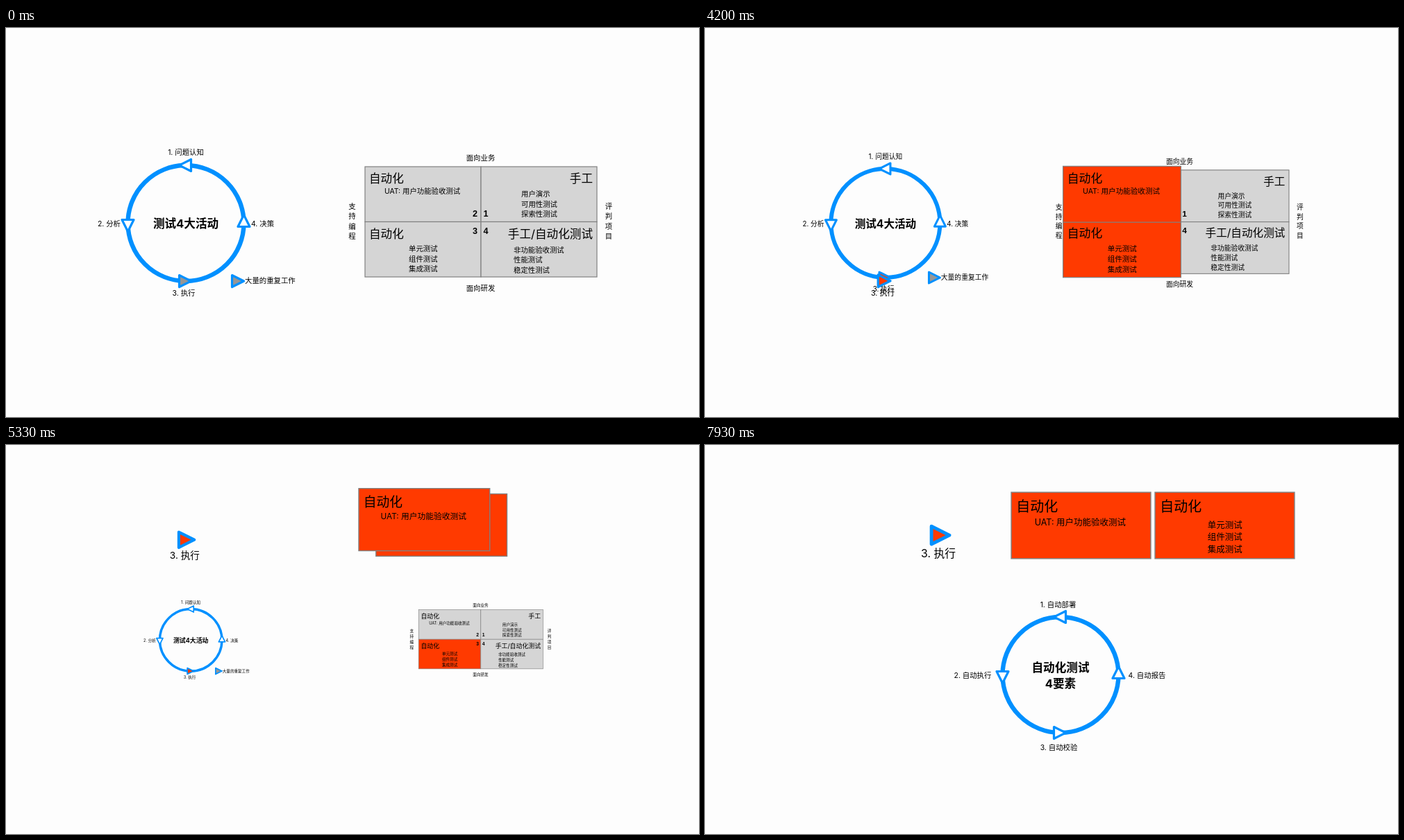
Write an HTML page that moves like this. It is 998x561 px and loops after 7960 ms.

```html
<!DOCTYPE html>
<html lang="zh-CN">
<head>
<meta charset="utf-8">
<title>自动化测试</title>
<style>
html, body { margin: 0; width: 100%; height: 100%; overflow: hidden; background: #fdfdfd; }
svg { display: block; width: 998px; height: 561px; }
text { font-family: Inter, "Noto Sans CJK SC", "Noto Sans CJK", sans-serif; fill: #000; }
.digit { font-family: "Liberation Sans", Arial, sans-serif; font-weight: 700; }
.cell { stroke: #808080; stroke-width: 1.2; }
.arrow { stroke: #0090ff; stroke-width: 3.2; stroke-linejoin: round; }
.ring { fill: none; stroke: #0090ff; stroke-width: 6.4; }
</style>
</head>
<body>
<svg id="stage" viewBox="0 0 998 561"></svg>
<script>
const LOOP = 7960;
const SMALL = 10.4, LARGE = 16.6;
const GRAY = [213, 213, 213], ARROW_GRAY = [150, 150, 150], RED = [255, 58, 0];

const rgb = c => `rgb(${c.map(Math.round).join()})`;
const lerp = (a, b, p) => a + (b - a) * p;
const mix = (a, b, p) => a.map((v, i) => lerp(v, b[i], p));
const phase = (t, from, to) => Math.min(1, Math.max(0, (t - from) / (to - from)));
const smooth = u => u * u * (3 - 2 * u);
const sine = u => (1 - Math.cos(Math.PI * u)) / 2;

// Text is placed by the vertical centre of its glyphs.
const text = (x, cy, str, { size = SMALL, anchor = 'start', extra = '' } = {}) =>
  `<text x="${x}" y="${cy + size * 0.375}" font-size="${size}" text-anchor="${anchor}" ${extra}>${str}</text>`;
const centred = (x, cy, str) => text(x, cy, str, { anchor: 'middle' });
const heading = (x, cy, str, anchor) => text(x, cy, str, { size: LARGE, anchor });
const title = (x, cy, str) => text(x, cy, str, { size: LARGE, anchor: 'middle', extra: 'font-weight="700"' });
const digit = (x, cy, n) => text(x, cy, n, { size: 12.6, anchor: 'middle', extra: 'class="digit"' });
const lines = (x, cy, list, put = text) => list.map((s, i) => put(x, cy + i * 14.5, s)).join('');

const arrow = (x, y, angle = 0, fill = '#fff', id = '') =>
  `<path class="arrow" id="${id}" d="M-7.5-8.5L9.5 0L-7.5 8.5Z" fill="${fill}" transform="translate(${x} ${y}) rotate(${angle})"/>`;
const cell = (x, y, fill, id = '') =>
  `<rect class="cell" id="${id}" x="${x}" y="${y}" width="167" height="79.5" fill="${fill}"/>`;

const ring = (x, y, bottomId = '') =>
  `<circle class="ring" cx="${x}" cy="${y}" r="83.5"/>` +
  arrow(x, y - 83.5, 180) + arrow(x - 83.5, y + 2.5, 90) +
  arrow(x - 2, y + 83.5, 0, '#fff', bottomId) + arrow(x + 83.5, y - 2.5, -90);

const acceptance = heading(523, 217, '自动化') + text(545, 235.5, 'UAT: 用户功能验收测试');
const unit = heading(523, 296.5, '自动化') + lines(580, 318.5, ['单元测试', '组件测试', '集成测试']);
const execute = centred(256, 382, '3. 执行');

const activities = ring(259, 281.5, 'runArrow') +
  title(259, 282, '测试4大活动') +
  centred(259, 179.5, '1. 问题认知') + centred(148.5, 282.5, '2. 分析') +
  execute + centred(369.5, 282, '4. 决策') +
  arrow(333, 365, 0, rgb(ARROW_GRAY)) + text(344, 364.5, '大量的重复工作');

const quadrants =
  cell(517, 200, '', 'cell2') + cell(684, 200, rgb(GRAY)) +
  cell(517, 279.5, '', 'cell3') + cell(684, 279.5, rgb(GRAY)) +
  acceptance + unit +
  heading(845, 217, '手工', 'end') + lines(742, 239.5, ['用户演示', '可用性测试', '探索性测试']) +
  heading(845, 296.5, '手工/自动化测试', 'end') + lines(731, 320, ['非功能验收测试', '性能测试', '稳定性测试']) +
  digit(675.5, 267, 2) + digit(691, 267, 1) + digit(675.5, 292, 3) + digit(691, 292, 4) +
  centred(683.5, 187, '面向业务') + centred(683.5, 375, '面向研发') +
  lines(498.5, 257, [...'支持编程'], centred) + lines(868, 257, [...'评判项目'], centred);

const elements = ring(512, 331.5) +
  title(512, 321, '自动化测试') + title(512, 343.5, '4要素') +
  centred(508.5, 230, '1. 自动部署') + centred(385.5, 332, '2. 自动执行') +
  centred(509.5, 436.5, '3. 自动校验') + centred(636.5, 332, '4. 自动报告');

const stage = document.getElementById('stage');
stage.innerHTML =
  `<g id="overview"><g id="activities">${activities}</g><g id="quadrants">${quadrants}</g></g>` +
  `<g id="movers"><g id="unitCard">${cell(517, 279.5, rgb(RED))}${unit}</g>` +
  `<g id="acceptCard">${cell(517, 200, rgb(RED))}${acceptance}</g>` +
  `<g id="runMark">${arrow(257, 365, 0, rgb(RED))}${execute}</g></g>` +
  `<g id="elements">${elements}</g>`;
const el = Object.fromEntries([...stage.querySelectorAll('[id]')].filter(n => n.id).map(n => [n.id, n]));

// Each pose is [centre x, centre y, scale]: start, lifted, settled.
const paths = {
  unitCard: [[600.5, 319.25, 1], [629.5, 97.5, 1.146], [748.5, 116, 1.203]],
  acceptCard: [[600.5, 239.75, 1], [602.5, 96, 1.146], [541.5, 116, 1.203]],
  runMark: [[256, 372, 1], [257.5, 126, 1.345], [336, 140.7, 1.52]],
};

const place = (node, [ox, oy], x, y, k) =>
  node.setAttribute('transform', `translate(${x} ${y}) scale(${k}) translate(${-ox} ${-oy})`);
const show = (node, opacity) => {
  node.setAttribute('opacity', opacity);
  node.style.display = opacity > 0 ? '' : 'none';
};

function draw(t) {
  const redden = smooth(phase(t, 20, 780));
  const lifting = t >= 3970;
  const u = phase(t, 3960, 5560);
  const zoom = lerp(u, smooth(u), 0.4);
  const lift = sine(phase(t, 4290, 5565));
  const settle = smooth(phase(t, 5550, 6070));

  el.cell2.setAttribute('fill', rgb(lifting ? GRAY : mix(GRAY, RED, redden)));
  el.cell3.setAttribute('fill', rgb(mix(GRAY, RED, redden)));
  el.runArrow.setAttribute('fill', rgb(mix(ARROW_GRAY, RED, redden)));

  const shrink = lerp(1, 0.48, zoom);
  place(el.activities, [274.5, 281], 274.5, 281, shrink);
  place(el.quadrants, [683.5, 281], 683.5, 281, shrink);
  show(el.overview, 1 - settle);

  show(el.movers, lifting ? 1 : 0);
  for (const [id, [start, up, end]] of Object.entries(paths)) {
    const [x, y, k] = [lift, lift, zoom].map((p, i) => lerp(lerp(start[i], up[i], p), end[i], settle));
    place(el[id], start, x, y, k);
  }
  show(el.elements, smooth(phase(t, 6120, 6750)));
}

const origin = performance.now();
function tick() {
  draw((performance.now() - origin) % LOOP);
  requestAnimationFrame(tick);
}
draw(0);
requestAnimationFrame(tick);
</script>
</body>
</html>
```
